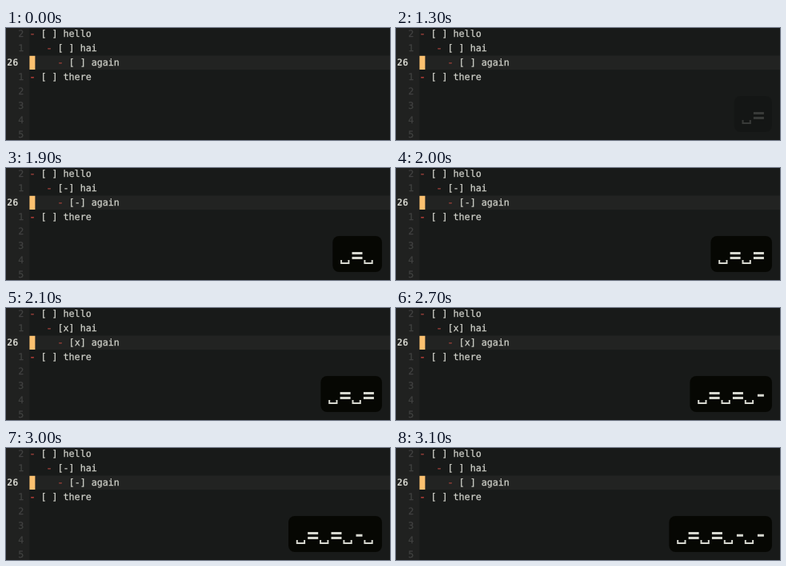
An HTML page that plays this animation: 480 by 140 pixels, repeating every 6100 ms.

```html
<!DOCTYPE html>
<html lang="en">
<head>
<meta charset="utf-8">
<title>Nested checkboxes</title>
<style>
  html, body { margin: 0; width: 100%; height: 100%; overflow: hidden; background: #181a19; }
  svg { display: block; width: 100%; height: 100%; }
  text {
    font: 11.67px "DejaVu Sans Mono", monospace;
    white-space: pre;
    text-rendering: geometricPrecision;
    stroke-width: 0.25px;
  }
  .dash { stroke-width: 0.6px; }
  .current { font-weight: bold; stroke-width: 0; }
</style>
</head>
<body>
<svg id="stage" viewBox="0 0 480 140">
  <rect width="480" height="140" fill="#181a19"/>
  <rect width="29.4" height="140" fill="#202120"/>
  <rect y="34.4" width="480" height="17.8" fill="#222322"/>
  <rect x="29.4" y="34.8" width="7" height="17.2" fill="#fbc170"/>
  <g id="editor"></g>
  <g id="overlay">
    <rect id="panel" y="85" height="45" rx="8" fill="#060703"/>
    <path id="keys" fill="#d6d7cf"/>
  </g>
</svg>
<script>
const NS = "http://www.w3.org/2000/svg";
const $ = id => document.getElementById(id);
const LOOP = 6100, COL = 7.03, LEFT = 29.4, ROW = 18, BASE = 11;

const dim = "#414241", ink = "#d0d1ca", rust = "#8a3c36", red = "#b23c36";
const numbers = ["2", "1", "26", "1", "2", "3", "4", "5"];
const items = [
  { indent: 0, label: "hello", dash: rust },
  { indent: 3, label: "hai", dash: rust, toggles: true },
  { indent: 5, label: "again", dash: rust, toggles: true },
  { indent: 0, label: "there", dash: red }
];

// start time, checkbox mark, typed keys ("_" is the space bar), overlay opacity
const steps = [
  [0, " ", "", 0],
  [1300, " ", "_=", 0.17],
  [1400, "-", "_=", 0.6],
  [1500, "-", "_=", 1],
  [1900, "-", "_=_", 1],
  [2000, "-", "_=_=", 1],
  [2100, "x", "_=_=", 1],
  [2700, "x", "_=_=_-", 1],
  [2800, "-", "_=_=_-", 1],
  [3000, "-", "_=_=_-_", 1],
  [3100, " ", "_=_=_-_-", 1]
];

const glyphs = {
  "_": { width: 14.4, path: "m.8 115h2v3h7.3v-3h2v5h-11.3z" },
  "=": { width: 14.9, path: "m.8 105h13v3h-13zm0 6h13v3h-13z" },
  "-": { width: 11.6, path: "m2.5 107.8h8v3h-8z" }
};

function addText(col, row, color, str, style = "") {
  const el = document.createElementNS(NS, "text");
  el.setAttribute("x", LEFT + col * COL);
  el.setAttribute("y", BASE + row * ROW);
  el.setAttribute("fill", color);
  el.setAttribute("stroke", color);
  el.setAttribute("class", style);
  el.textContent = str;
  $("editor").append(el);
  return el;
}

numbers.forEach((n, row) => {
  if (row === 2) addText(-4, row, ink, n, "current");
  else addText(-2, row, dim, n);
});

const toggled = [];
items.forEach(({ indent, label, dash, toggles }, row) => {
  addText(indent, row, dash, "-", "dash");
  const box = addText(indent + 2, row, ink, "[ ]");
  addText(indent + 6, row, ink, label);
  if (toggles) toggled.push(box);
});

function drawKeys(keys) {
  const total = [...keys].reduce((sum, k) => sum + glyphs[k].width, 0);
  let x = 461 - total, d = "";
  $("panel").setAttribute("x", x - 9);
  $("panel").setAttribute("width", total + 18);
  for (const k of keys) {
    d += `M${x} 0${glyphs[k].path}`;
    x += glyphs[k].width;
  }
  $("keys").setAttribute("d", d);
}

let shown;
function render(time) {
  const step = steps.findLast(s => s[0] <= time);
  if (step === shown) return;
  shown = step;
  const [, mark, keys, opacity] = step;
  toggled.forEach(box => { box.textContent = `[${mark}]`; });
  $("overlay").setAttribute("opacity", opacity);
  drawKeys(keys);
}

const start = performance.now();
function tick() {
  render((performance.now() - start) % LOOP);
  requestAnimationFrame(tick);
}
tick();
</script>
</body>
</html>
```
